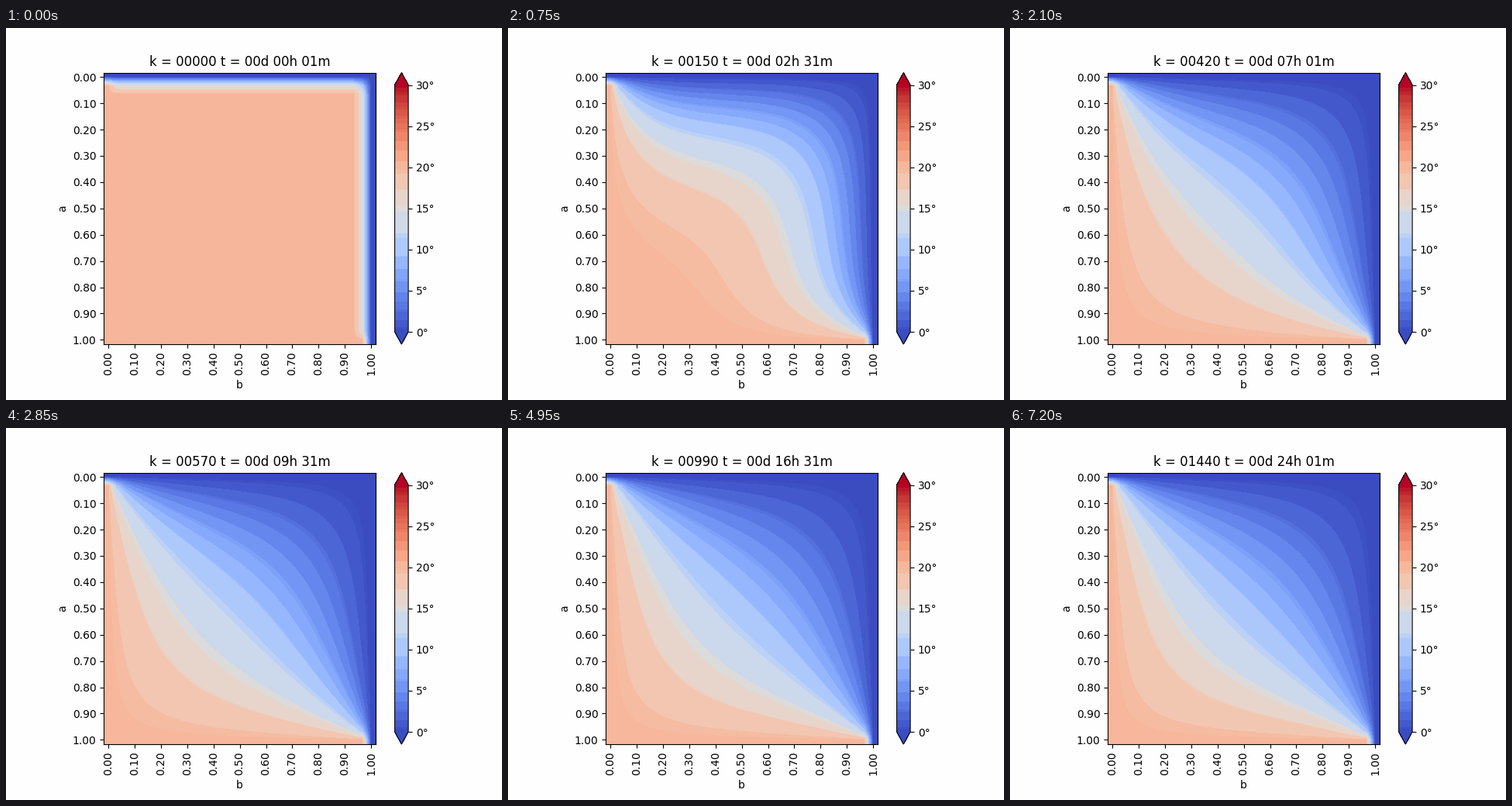
A matplotlib script that plays this animation: 640 px wide and 480 px high, repeating every 7350 ms.

```python
import numpy as np
import matplotlib.pyplot as plt
from matplotlib.animation import FuncAnimation
from matplotlib.colors import ListedColormap

N = 31                # grid points per side
FRAMES = 49
STEPS = 30            # one-minute solver steps per frame
R = 0.25              # alpha * dt / h^2
T_COLD, T_WARM, T_MAX = 0.0, 20.0, 30.0
VIEW = 350            # plot size in pixels

plt.rcParams["font.family"] = "DejaVu Sans"


def solve():
    """Explicit heat equation on a square plate with fixed edges."""
    temp = np.full((N, N), T_WARM)
    temp[0, :] = temp[:, -1] = T_COLD
    states = []
    for k in range((FRAMES - 1) * STEPS + 1):
        mid = temp[1:-1, 1:-1]
        around = temp[:-2, 1:-1] + temp[2:, 1:-1] + temp[1:-1, :-2] + temp[1:-1, 2:]
        new = temp.copy()
        new[1:-1, 1:-1] = mid + R * (around - 4 * mid)
        temp = new
        if k % STEPS == 0:
            states.append(temp)
    return states


def lerp_matrix():
    pos = np.clip((np.arange(VIEW) + 0.5) * N / VIEW - 0.5, 0, N - 1)
    return np.maximum(0, 1 - np.abs(pos[:, None] - np.arange(N)))


LUT = plt.get_cmap("coolwarm")(np.arange(256), bytes=True)[:, :3].astype(int)
_, CELL = np.unique(LUT >> np.array([5, 4, 5]), axis=0, return_inverse=True)
CELL = CELL.ravel()
LERP = lerp_matrix()
BAR = np.full(256, 20.0)      # colorbar pixels per colour
BAR[[0, -1]] += 120           # pointed ends


def banded_cmap(temp):
    """Merge colours into coarse RGB cells, each shown as its mean colour in the view."""
    fine = LERP @ temp @ LERP.T
    idx = np.clip(fine / T_MAX * 256 + 1e-9, 0, 255).astype(int)
    weight = np.bincount(idx.ravel(), minlength=256) + BAR
    total = np.bincount(CELL, weight)
    mean = [np.bincount(CELL, weight * LUT[:, c]) / total for c in range(3)]
    return ListedColormap(np.floor(np.array(mean).T[CELL] + 1e-6) / 255)


states = solve()

fig, ax = plt.subplots(figsize=(6.4, 4.8), dpi=100, facecolor="#fefefe")
fig.subplots_adjust(bottom=0.15)
image = ax.imshow(states[0], cmap=banded_cmap(states[0]), vmin=0, vmax=T_MAX,
                  interpolation="bilinear")
fig.colorbar(image, ax=ax, extend="both", ticks=range(0, 31, 5), format="%d°")

ticks = np.arange(0, N, 3)
labels = [f"{t / (N - 1):.2f}" for t in ticks]
ax.set_xticks(ticks, labels, rotation=90)
ax.set_yticks(ticks, labels)
ax.set_xlabel("b")
ax.set_ylabel("a")
title = ax.set_title("")


def update(i):
    k = i * STEPS
    hours, minutes = divmod(k + 1, 60)
    title.set_text(f"k = {k:05d} t = 00d {hours:02d}h {minutes:02d}m")
    image.set_data(states[i])
    image.set_cmap(banded_cmap(states[i]))
    return image, title


anim = FuncAnimation(fig, update, frames=FRAMES, interval=150, repeat=True,
                     repeat_delay=0, blit=False)
plt.show()
```
